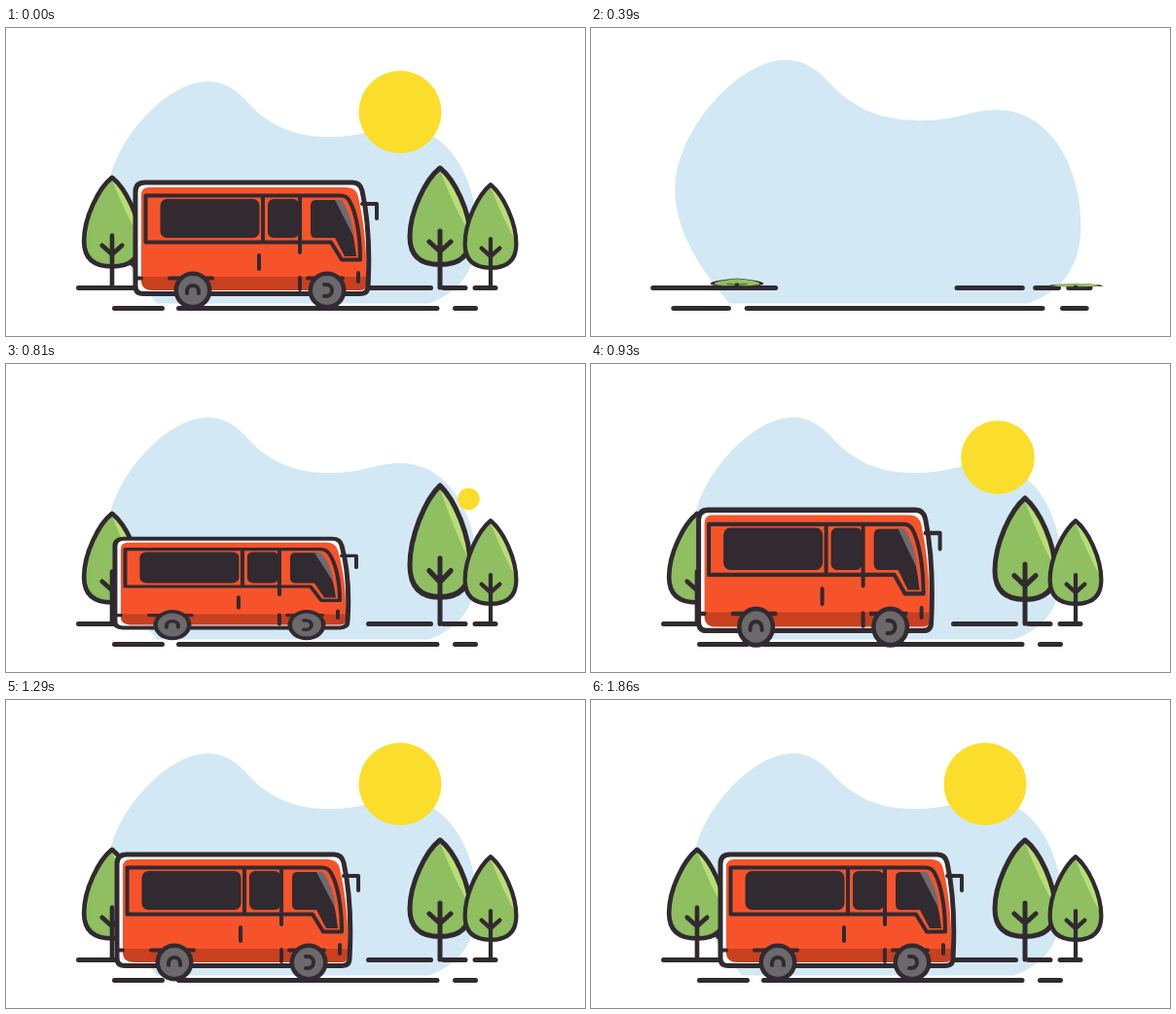
These frames come from a looping animation (595x317 px, 1.89 s). An HTML page:

```html
<!DOCTYPE html>
<html lang="en">
<head>
<meta charset="utf-8">
<title>Bus trip</title>
<style>
html, body { margin: 0; width: 100%; height: 100%; overflow: hidden; background: #fff; }
svg { display: block; width: 100%; height: 100%; }
.line { fill: none; stroke: #312a30; stroke-width: 5; stroke-linecap: round; stroke-linejoin: round; }
.thin { stroke-width: 4; }
.dark { fill: #312a30; }
</style>
</head>
<body>
<svg viewBox="0 0 595 317">
  <defs>
    <path id="leaf" d="M0-123C15-111 31-78 31-52C31-30 17-23.500 0-23.500S-31-30-31-52C-31-78-15-111 0-123Z"/>
    <g id="tree">
      <use href="#leaf" fill="#8fbf60"/>
      <path fill="#bade75" d="M0-123C15-111 31-78 31-54Q14-84 0-120Z"/>
      <use href="#leaf" class="line"/>
      <path class="line" d="M0-58V0M-11-47L0-37L11-47"/>
    </g>
    <g id="wheel">
      <circle r="19.5" class="dark"/>
      <circle r="15" fill="#6b696c"/>
      <path class="line thin" d="M-6 3V1A6 6 0 0 1 6 1V3"/>
    </g>
    <path id="shell" d="M133 168.500Q133 159 143 159H356Q364 159 366 167.500C372 195 374 228 372 265.500Q372 273.500 364 273.500H141Q133 273.500 133 265.500Z"/>
  </defs>

  <path id="blob" fill="#d2e8f4" d="M155 283.5C128 252 104 215 104 177C104 120 165 55 207 55C224 55 236 63 247 75C268 98 292 112 333 112C370 112 380 102 405 102C455 102 484 155 484 211C484 250 465 273 434 283.5Z"/>
  <circle id="sun" r="42.5" fill="#fbde2b"/>
  <path id="ground" class="line" d="M74.500 267.500H194.500M372.500 267.500H436.500M449.500 267.500H472M482 267.500H503"/>
  <path id="road" class="line" d="M111.500 288.500H160.500M177.500 288.500H443M461.500 288.500H482.500"/>
  <use id="left2" href="#tree"/>
  <use id="left1" href="#tree"/>
  <use id="right1" href="#tree"/>
  <use id="right2" href="#tree"/>

  <g id="bus">
    <use href="#shell" fill="#fff"/>
    <path fill="#f7532a" d="M139 172Q139 164 147 164H350Q360 164 362 174C369 205 371 235 370 257H139Z"/>
    <path fill="#c8401f" d="M139 256H370V264Q370 270 364 270H151Q139 270 139 260Z"/>
    <use href="#shell" class="line"/>
    <rect class="dark" x="158.500" y="176" width="102" height="40" rx="7"/>
    <rect class="dark" x="269" y="176" width="32" height="40" rx="6"/>
    <path class="dark" d="M318 177H341C353 190 358 215 360 235H348L338 216H318Q313 216 313 210V183Q313 177 318 177Z"/>
    <path fill="#6d6b70" d="M338 177H345C352 188 357 203 357 214Z"/>
    <path class="line thin" d="M143.500 172.500V220.500H334L345 238.500H364C364 214 360 190 353 178Q350 172.500 344 172.500ZM264 173V220M302 173V231M302 257V269M260 234V248M362 252V261M366 181H381V196M134 257.500H139M168 257.500H212M310 257.500H346"/>
    <use href="#wheel" x="192" y="270"/>
    <use href="#wheel" transform="translate(330 270) rotate(90)"/>
  </g>
</svg>
<script>
const LOOP = 1890, STEP = 30;

// Sine-eased value through pairs of time and value.
function ease(t, ...keys) {
  if (t <= keys[0]) return keys[1];
  for (let i = 2; i < keys.length; i += 2) {
    const [t0, v0, t1, v1] = keys.slice(i - 2, i + 2);
    if (t < t1) return v0 + (v1 - v0) * (1 - Math.cos(Math.PI * (t - t0) / (t1 - t0))) / 2;
  }
  return keys.at(-1);
}

const quad = p => p < .5 ? 2 * p * p : 1 - 2 * (1 - p) ** 2;

function place(id, value) {
  document.getElementById(id).setAttribute('transform', value);
}

function scaleAt(id, x, y, sx, sy, dx = 0) {
  place(id, `translate(${x + dx} ${y}) scale(${sx} ${sy}) translate(${-x} ${-y})`);
}

function tree(id, x, width, height, grow, lift = 0) {
  place(id, `translate(${x} ${267 - lift}) scale(${grow ? width : 0} ${height * grow})`);
}

function draw(t) {
  const blob = ease(t, 48, 0, 288, 1.157, 530, 1);
  scaleAt('blob', 285, 284, blob, blob);
  scaleAt('ground', 297, 267.5, ease(t, 30, 0, 245, 1.15, 480, 1), 1);
  const road = ease(t, 127, 0, 357, 1.15, 580, 1);
  scaleAt('road', 297, 288.5, road, road ? 1 : 0);

  tree('left2', 150, .82, .745, ease(t, 340, 0, 600, 1.13, 810, .95, 1000, 1));
  tree('left1', 109, .93, .92, ease(t, 428, 0, 680, 1.15, 810, 1));
  tree('right1', 446, 1, 1, ease(t, 490, 0, 795, 1.155, 1050, .96, 1200, 1));
  tree('right2', 498, .85, .86, ease(t, 370, 0, 540, 1.12, 620, 1.02, 790, 1),
    ease(t, 480, 0, 600, 9, 740, 0));

  const sun = ease(t, 705, 0, 1035, 1.155, 1230, 1);
  const away = ease(t, 705, 1, 1000, 0);
  place('sun', `translate(${405 + 98 * away} ${86.5 + 73 * away}) scale(${sun})`);

  const bus = ease(t, 685, 0, 880, 1.12, 1050, .943, 1230, 1);
  const drive = quad(Math.min(1, Math.max(0, (t - 1050) / 810)));
  scaleAt('bus', 250, 263, bus ? 1 : 0, bus, ease(t, 650, -20, 1050, -23) + 23 * drive);
}

function tick() {
  const t = Math.floor(performance.now() % LOOP / STEP) * STEP;
  draw(t || LOOP); // the loop opens on the finished scene
  requestAnimationFrame(tick);
}
tick();
</script>
</body>
</html>
```
